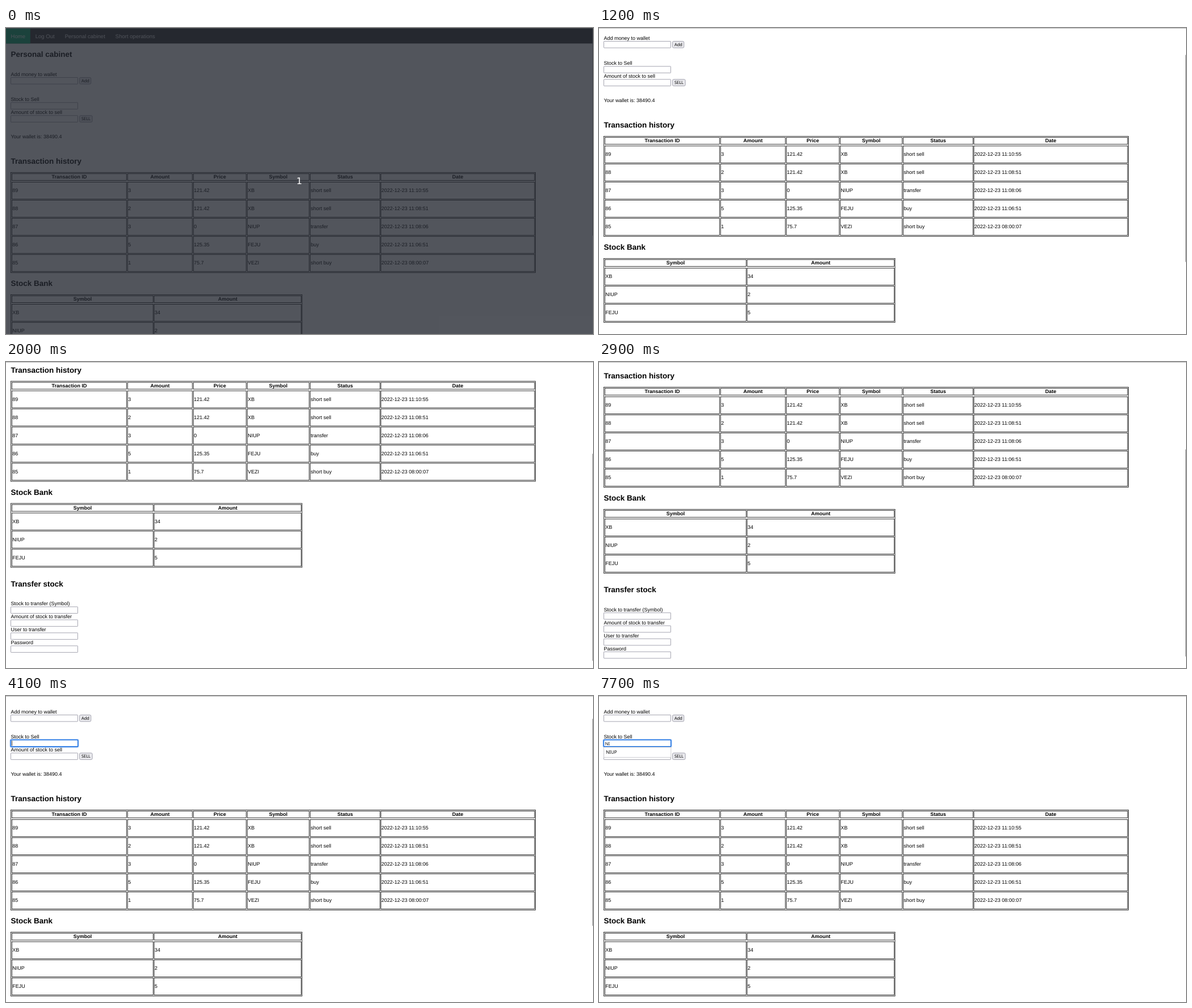
An HTML page for the animation above (8000 ms loop, 1035 by 541 pixels).

```html
<!DOCTYPE html>
<html lang="en">
<head>
<meta charset="utf-8">
<title>Personal cabinet</title>
<style>
  html, body { margin: 0; width: 100%; height: 100%; overflow: hidden; background: #fff; }
  svg { display: block; width: 100vw; height: 100vh; }
  text { font: 9px "Liberation Sans", Arial, sans-serif; fill: #000; text-rendering: geometricPrecision; white-space: pre; }
  .h2 { font-size: 13.5px; font-weight: bold; }
  .th { font-weight: bold; text-anchor: middle; }
  .nav { font-size: 9.5625px; fill: #f2f2f2; }
  .ui { font-family: "Noto Sans", "Open Sans", sans-serif; font-size: 7.5px; }
  .cell { fill: none; stroke: #000; stroke-width: .8; }
  .field { fill: #fff; stroke: #8f8f9d; stroke-width: .8; }
  .button { fill: #e9e9ed; stroke: #8f8f9d; stroke-width: .8; }
</style>
</head>
<body>
<svg id="stage" viewBox="0 0 1035 541" preserveAspectRatio="none"></svg>
<script>
const LOOP = 8000, STEP = 100;
const stage = document.getElementById('stage');

function add(parent, tag, attrs, content) {
  const node = document.createElementNS('http://www.w3.org/2000/svg', tag);
  for (const key in attrs) node.setAttribute(key, attrs[key]);
  if (content !== undefined) node.textContent = content;
  parent.appendChild(node);
  return node;
}
const show = (node, on) => node.setAttribute('visibility', on ? 'visible' : 'hidden');

const page = add(stage, 'g', {});
const rect = (x, y, width, height, attrs) => add(page, 'rect', { x, y, width, height, ...attrs });
const text = (x, y, content, cls = '') => add(page, 'text', { x, y, class: cls }, content);
const field = y => rect(8.5, y, 118, 11.6, { class: 'field', rx: .6 });

function labelledField(y, label) {
  text(8.4, y, label);
  return field(y + 2.5);
}

function button(y, width, label) {
  rect(129.6, y, width, 11.6, { class: 'button', rx: 2 });
  text(132.9, y + 8.6, label, 'ui');
}

// Cells are laid out from [left, right] column edges; rows are 32px apart.
function table(top, right, columns, heads, rows) {
  const box = (x1, y1, x2, y2) => rect(x1, y1, x2 - x1, y2 - y1, { class: 'cell' });
  box(8.5, top, right, top + 17 + rows.length * 32);
  columns.forEach(([x1, x2], c) => {
    box(x1, top + 2, x2, top + 14);
    text((x1 + x2) / 2, top + 10.8, heads[c], 'th');
    rows.forEach((row, r) => {
      const y = top + 17 + r * 32;
      box(x1, y, x2, y + 30);
      text(x1 + .7, y + 17.9, row[c]);
    });
  });
}

rect(0, 0, 1035, 27.4, { fill: '#333' });
rect(0, 0, 42.8, 27.4, { fill: '#04aa6d' });
[[8.5, 'Home'], [51.7, 'Log Out'], [103.7, 'Personal cabinet'], [192.8, 'Short operations']]
  .forEach(([x, label]) => text(x, 17.5, label, 'nav'));

text(8.4, 51, 'Personal cabinet', 'h2');
labelledField(85, 'Add money to wallet');
button(87.5, 20.2, 'Add');
const stockField = labelledField(129.3, 'Stock to Sell');
const amountField = labelledField(152.3, 'Amount of stock to sell');
button(154.8, 22.6, 'SELL');
text(8.4, 194.9, 'Your wallet is: 38490.4');

text(8.4, 240.4, 'Transaction history', 'h2');
table(255.5, 933.5,
  [[10.5, 212.5], [214.5, 328.5], [330.5, 423.5], [425.5, 534.5], [536.5, 659.5], [661.1, 932]],
  ['Transaction ID', 'Amount', 'Price', 'Symbol', 'Status', 'Date'],
  [
    ['89', '3', '121.42', 'XB', 'short sell', '2022-12-23 11:10:55'],
    ['88', '2', '121.42', 'XB', 'short sell', '2022-12-23 11:08:51'],
    ['87', '3', '0', 'NIUP', 'transfer', '2022-12-23 11:08:06'],
    ['86', '5', '125.35', 'FEJU', 'buy', '2022-12-23 11:06:51'],
    ['85', '1', '75.7', 'VEZI', 'short buy', '2022-12-23 08:00:07']
  ]);

text(8.4, 456.2, 'Stock Bank', 'h2');
table(471.5, 522, [[10.5, 259.5], [261.2, 520.6]], ['Symbol', 'Amount'],
  [['XB', '34'], ['NIUP', '2'], ['FEJU', '5']]);

text(8.4, 618.2, 'Transfer stock', 'h2');
['Stock to transfer (Symbol)', 'Amount of stock to transfer', 'User to transfer', 'Password']
  .forEach((label, i) => labelledField(651.8 + i * 23, label));

const focus = add(page, 'g', {});
add(focus, 'rect', { x: 7.6, y: 131, width: 120, height: 13.2, rx: 2, fill: 'none', stroke: '#0060df', 'stroke-opacity': .3, 'stroke-width': 2.4 });
add(focus, 'rect', { x: 8.4, y: 131.7, width: 118.4, height: 11.8, rx: 1, fill: '#fff', stroke: '#0060df', 'stroke-width': 1.3 });
const typed = text(10.8, 140.6, '', 'ui');
const caret = rect(10, 133, .8, 9, { fill: '#000' });
const suggestion = add(page, 'g', {});
add(suggestion, 'rect', { x: 8.5, y: 144.4, width: 118.4, height: 18.2, fill: '#fff', stroke: '#c4c4c8', 'stroke-width': .8 });
add(suggestion, 'text', { x: 12.2, y: 156.4, class: 'ui', style: 'font-size:8px' }, 'NIUP');

add(stage, 'rect', { width: 1035, height: 1, fill: '#b9b9b9' });
const thumb = add(stage, 'rect', { x: 1034, width: 1, height: 366, fill: '#8a8a8a' });

const countdown = add(stage, 'g', {});
add(countdown, 'rect', { width: 1035, height: 541, fill: '#22262f', 'fill-opacity': .78 });
add(countdown, 'text', { x: 517, y: 276, 'text-anchor': 'middle', style: 'font:16px "DejaVu Sans",sans-serif;fill:#fff' }, '1');

// Each wheel gesture: the time it starts to show and the offset after every step.
const gestures = [
  [900, [9, 36, 57, 64]],
  [1600, [64.5]],
  [1800, [194.4, 216, 221.5]],
  [2900, [211, 172, 114, 69, 54]]
];

function scrollAt(t) {
  let offset = 0;
  for (const [start, steps] of gestures) {
    if (t >= start) offset = steps[Math.min(steps.length - 1, Math.floor((t - start) / STEP))];
  }
  return offset;
}

const within = (t, from, to) => t >= from && t < to;
const hover = (node, on) => node.setAttribute('style', on ? 'stroke:#56565f' : '');

function render(t) {
  const scroll = scrollAt(t);
  page.setAttribute('transform', `translate(0 ${-scroll})`);
  thumb.setAttribute('y', 1 + scroll * .728);
  const fade = Math.floor((t - 5600) / STEP) + 1;
  thumb.setAttribute('opacity', Math.max(0, Math.min(1, 1 - fade / 3)));

  show(countdown, t < 100);
  hover(amountField, within(t, 3500, 3700));
  hover(stockField, t >= 3800);
  show(focus, t >= 4100);
  show(caret, within(t, 4100, 5300) || within(t, 6500, 7700));
  caret.setAttribute('x', t < 7100 ? 10.2 : t < 7500 ? 16.4 : 18.3);
  typed.textContent = t < 7100 ? '' : t < 7500 ? 'N' : 'NI';
  show(suggestion, t >= 7200);
}

const began = performance.now();
function tick() {
  render((performance.now() - began) % LOOP);
  requestAnimationFrame(tick);
}
tick();
</script>
</body>
</html>
```
